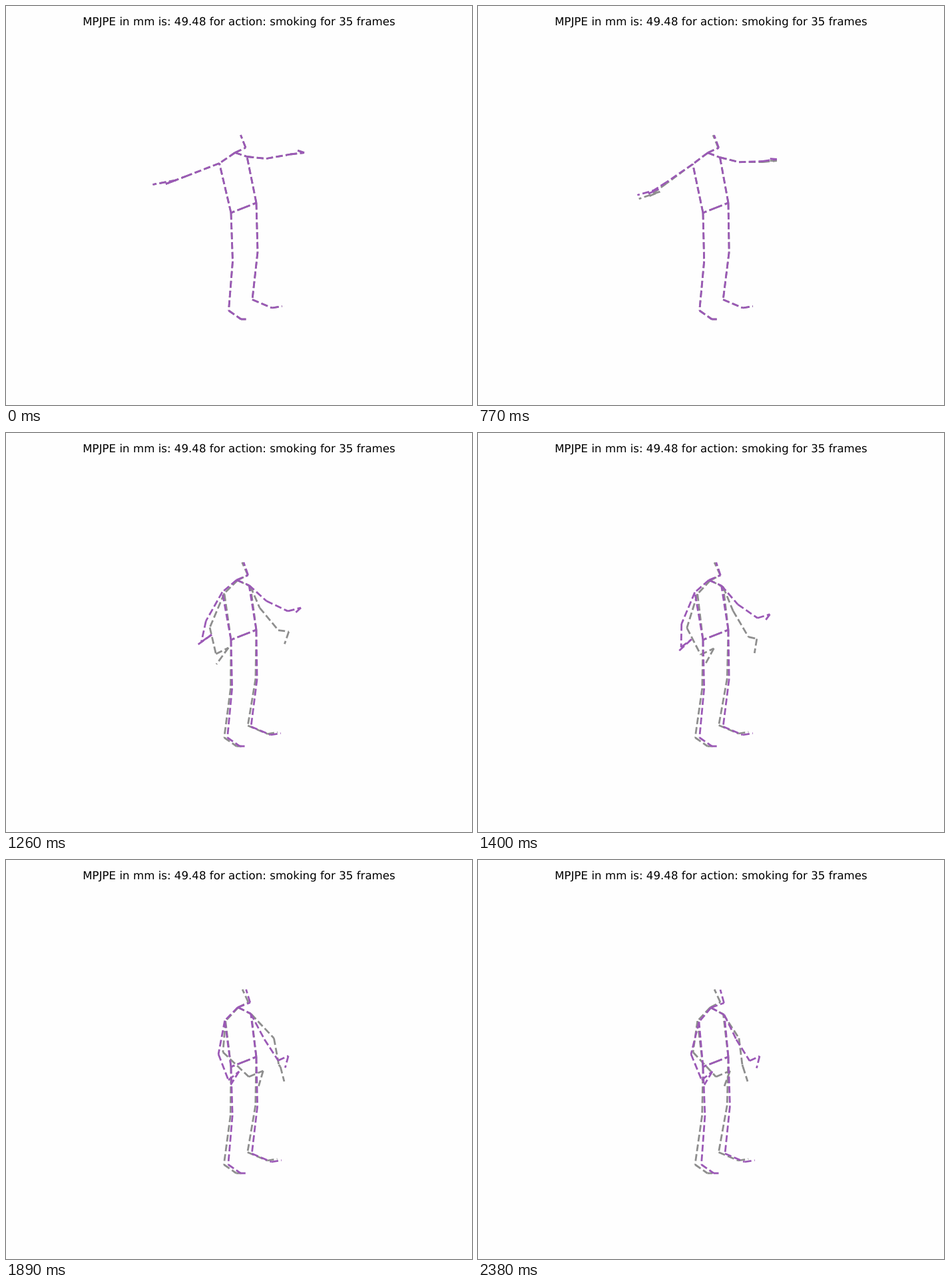
Write an HTML page with a canvas that moves like this. It is 700 by 600 pixels and loops after 2450 ms.

```html
<!DOCTYPE html>
<html lang="en">
<head>
<meta charset="utf-8">
<title>Pose forecast</title>
<style>
  html, body { margin: 0; width: 100%; height: 100%; overflow: hidden; background: #fefefe; }
  canvas, svg { position: absolute; left: 0; top: 0; }
  text { font: 16.667px "DejaVu Sans", sans-serif; text-anchor: middle; text-rendering: geometricPrecision; }
</style>
</head>
<body>
<canvas id="stage" width="700" height="600"></canvas>
<svg width="700" height="600">
  <text x="350" y="29">MPJPE in mm is: 49.48 for action: smoking for 35 frames</text>
</svg>
<script>
const STEP = 70, COUNT = 35, LAST = COUNT - 1;
const ctx = document.getElementById('stage').getContext('2d');

// Opening pose; R and L are the figure's own sides.
const rest = {
  pelvis: [357, 303.5], neck: [344, 220.5], nose: [360, 213], head: [352.5, 194],
  hipR: [338, 311], kneeR: [340.5, 384], ankleR: [334.5, 458], footR: [353, 471], toeR: [360.5, 471],
  hipL: [376, 296], kneeL: [378, 370], ankleL: [370, 441.5], footL: [399.5, 454], toeL: [414.7, 451.5],
  shoulderR: [320.5, 236.5], elbowR: [278, 259], wristR: [245, 271.5], thumbR: [260, 266], tipR: [225.5, 272.5],
  shoulderL: [362, 226.5], elbowL: [392, 229.5], wristL: [428, 223], thumbL: [449, 220.5], tipL: [438, 217]
};
const armParts = ['elbow', 'wrist', 'thumb', 'tip'];
const legParts = ['knee', 'ankle', 'foot', 'toe'];

// Progress helpers over the ticks a to b.
const span = (t, a, b) => Math.min(1, Math.max(0, (t - a) / (b - a)));
const smooth = (t, a, b) => { const u = span(t, a, b); return u * u * (3 - 2 * u); };
const wave = (t, a, b, turns) => Math.sin(2 * Math.PI * turns * span(t, a, b));

// Smooth move that swings past its end and comes back.
function settle(t, a, b, over) {
  const mid = (a + b) / 2;
  return smooth(t, a, b) + over * wave(t, mid, mid + b - a, 0.5);
}

const turn = t => (t / LAST) ** 1.5;
const sway = t => t / LAST - 2.5 * wave(t, 0, LAST, 0.5);

// lean: how far joints shift in a full turn; arms: end points and progress on each axis.
const guess = {
  color: '#9b59b6',
  turn, sway, lift: () => 0,
  lean: { neck: [6, 1.5], nose: [9.5, 2], head: [11.5, 1], shoulderR: [11.5, 7], shoulderL: [8, 6.5] },
  arms: {
    R: {
      end: [[320, 292], [336, 331], [352, 318], [340, 338]],
      drift: [5, 4],
      x: t => smooth(t, 6, 29),
      y: t => smooth(t, 6, 24.5)
    },
    L: {
      end: [[388, 270], [408, 302], [423, 295], [418.5, 313]],
      drift: [1, 0],
      x: t => smooth(t, 13, 29),
      y: t => smooth(t, 6, 28)
    }
  }
};

const truth = {
  color: '#8e8e8e',
  turn: t => Math.min(0.8, turn(t) + 0.35 * smooth(t, 14, 20)),
  sway: t => sway(t) - 6.5 * smooth(t, 14, 20) - 3 * smooth(t, 27, LAST),
  lift: t => 2 * smooth(t, 14, 20),
  lean: { ...guess.lean, nose: [5, 1], head: [3.3, 0.8] },
  arms: {
    R: {
      end: [[322, 289], [355, 326], [376, 317], [367, 340]],
      drift: [5, 4],
      x: t => settle(t, 7, 26, 0.09),
      y: t => settle(t, 7, 19, 0.14)
    },
    L: {
      end: [[392, 268], [397, 308], [398, 311], [405, 333]],
      drift: [1, 0],
      x: t => smooth(t, 12, 30),
      y: t => smooth(t, 8, 21),
      swing: t => -11 * wave(t, 13, 33, 1)
    }
  }
};

// Each bone is drawn from its first joint, where its dashes begin.
const bones = [];
for (const side of ['R', 'L']) {
  const chain = names => names.slice(1).forEach((n, i) => bones.push([names[i] + side, n + side]));
  chain(['hip', ...legParts]);
  chain(['hip', 'shoulder', ...armParts]);
  bones.push(['pelvis', 'hip' + side], ['neck', 'shoulder' + side]);
}
bones.push(['neck', 'nose'], ['nose', 'head']);

function pose(figure, t) {
  const at = { ...rest };
  const shift = (name, dx, dy) => { at[name] = [rest[name][0] + dx, rest[name][1] + dy]; };

  const k = figure.turn(t);
  for (const n in figure.lean) shift(n, k * figure.lean[n][0], k * figure.lean[n][1]);

  for (const side of ['R', 'L']) {
    for (const part of legParts) {
      const share = part === 'knee' ? 0.45 : 1;
      shift(part + side, share * figure.sway(t), side === 'L' ? -share * figure.lift(t) : 0);
    }
    const { end, drift, x, y, swing } = figure.arms[side];
    const early = 1 - smooth(t, 0, 8);
    armParts.forEach((part, i) => {
      const [x0, y0] = rest[part + side];
      shift(part + side,
        (end[i][0] - x0) * x(t) - drift[0] * early + (swing ? swing(t) : 0),
        (end[i][1] - y0) * y(t) - drift[1] * early);
    });
  }
  return at;
}

function drawFigure(figure, t) {
  const at = pose(figure, t);
  ctx.strokeStyle = figure.color;
  for (const [a, b] of bones) {
    ctx.beginPath();
    ctx.moveTo(...at[a]);
    ctx.lineTo(...at[b]);
    ctx.stroke();
  }
}

ctx.lineWidth = 2.78;
ctx.setLineDash([10.28, 4.44]);
let shown = -1;

function draw() {
  const tick = Math.floor(performance.now() / STEP) % COUNT;
  if (tick !== shown) {
    shown = tick;
    ctx.clearRect(0, 0, 700, 600);
    drawFigure(truth, tick);
    drawFigure(guess, tick);
  }
  requestAnimationFrame(draw);
}
draw();
</script>
</body>
</html>
```
